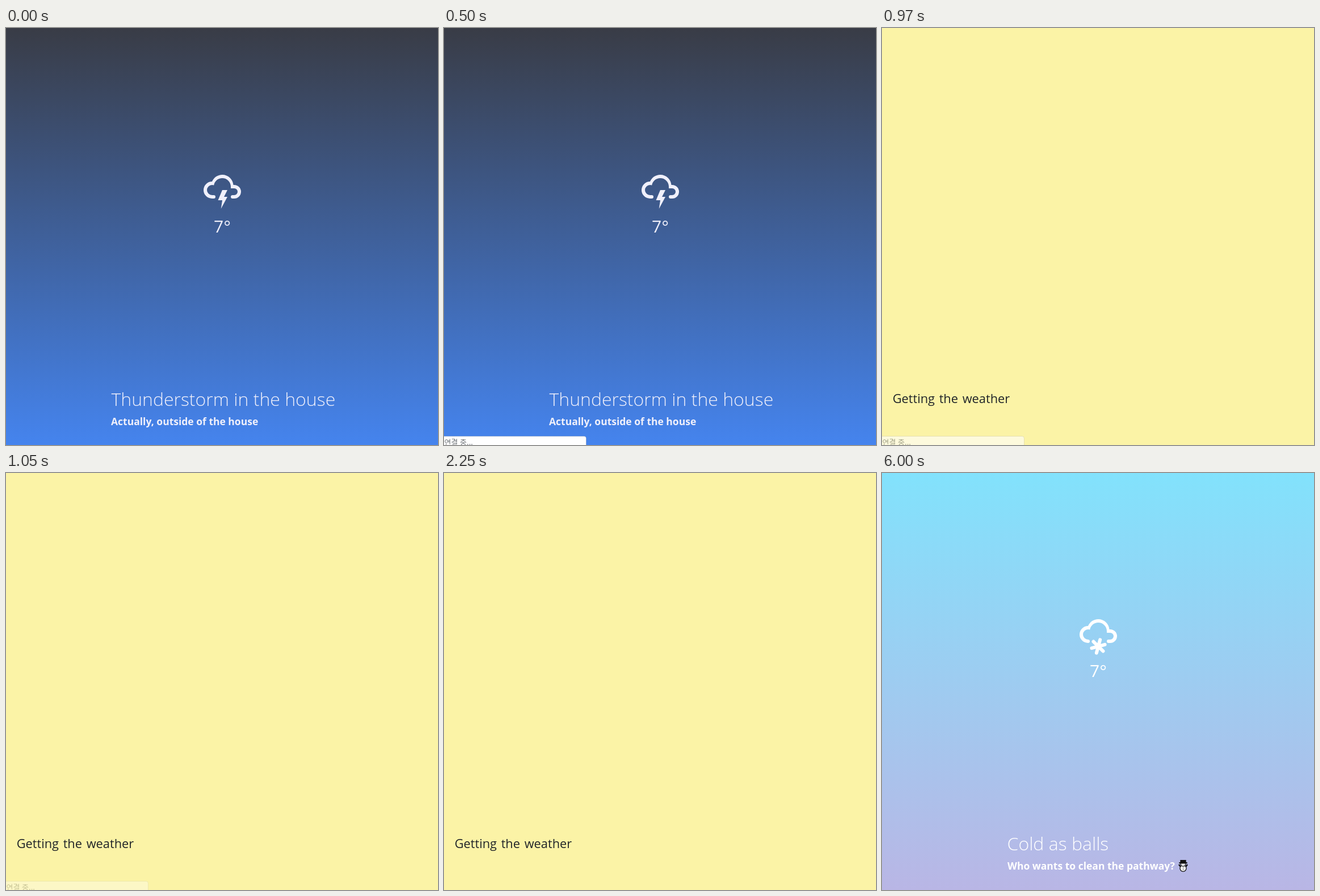
An HTML page that plays this animation: 761x736 px, repeating every 8 s.

```html
<!DOCTYPE html>
<html lang="en">
<head>
<meta charset="utf-8">
<title>Weather</title>
<style>
html, body { margin: 0; width: 100%; height: 100%; overflow: hidden; }
svg { display: block; }
text { font-family: "Open Sans", "Noto Sans", sans-serif; }
.temp { font-size: 30px; }
.title { font-size: 32px; font-weight: 300; }
.sub { font-size: 17.5px; font-weight: 700; }
.loading { font-size: 21.8px; word-spacing: 2px; fill: #212529; }
.status { font: 13px "Noto Sans CJK KR", "Noto Sans CJK", sans-serif; fill: #70757a; }
</style>
</head>
<body>
<svg width="761" height="736" viewBox="0 0 761 736">
  <defs>
    <linearGradient id="night" x2="0" y2="1">
      <stop stop-color="#393c46"/><stop offset="1" stop-color="#4584ee"/>
    </linearGradient>
    <linearGradient id="frost" x2="0" y2="1">
      <stop stop-color="#82e2fc"/><stop offset="1" stop-color="#b9b6e5"/>
    </linearGradient>
    <path id="cloud" d="M6 16A5 5 0 0 1 1 11A5 5 0 0 1 6 6C7 3.65 9.3 2 12 2C15.43 2 18.24 4.66 18.5 8.03L19 8A4 4 0 0 1 19 16H18A1 1 0 0 1 18 14H19A2 2 0 0 0 19 10H17V9A5 5 0 0 0 12 4C9.5 4 7.45 5.82 7.06 8.19C6.73 8.07 6.37 8 6 8A3 3 0 0 0 6 14A1 1 0 0 1 6 16Z"/>
  </defs>

  <g id="storm" fill="#f0f0fb">
    <rect width="761" height="736" fill="url(#night)"/>
    <g transform="translate(345 253) scale(3)">
      <use href="#cloud"/>
      <path d="M6 14H7A1 1 0 0 1 7 16H6ZM12 11H15L13 15H15L11.25 22L12 17H9.5Z"/>
    </g>
    <text class="temp" x="381" y="361" text-anchor="middle">7°</text>
    <text class="title" x="185.5" y="667">Thunderstorm in the house</text>
    <text class="sub" x="185" y="700.5">Actually, outside of the house</text>
  </g>

  <g id="loading">
    <rect width="761" height="736" fill="#fbf3a6"/>
    <text class="loading" x="18.7" y="662">Getting the weather</text>
  </g>

  <g id="snow" fill="#fff">
    <rect width="761" height="736" fill="url(#frost)"/>
    <g transform="translate(345 252) scale(3)">
      <use href="#cloud"/>
      <path d="M13.04 14.14L10.96 21.86M9.17 15.17L14.83 20.83M8.14 19.04L15.86 16.96" stroke="#fff" stroke-width="2" stroke-linecap="round"/>
    </g>
    <text class="temp" x="381" y="360" text-anchor="middle">7°</text>
    <text class="title" x="220.5" y="666">Cold as balls</text>
    <text class="sub" x="221" y="699.5">Who wants to clean the pathway?</text>
    <g stroke="#111" stroke-width="1.3">
      <path d="M523 691l3 4M538 691l-3 4" stroke-width="2.4"/>
      <circle cx="530.5" cy="697.8" r="5.5"/>
      <circle cx="530.5" cy="690" r="4.2"/>
      <path d="M526 683.6h9v4h2v1h-13v-1h2Z" fill="#111"/>
      <path d="M528.5 690h1M531.5 690h1M530 697h1M530 700h1"/>
    </g>
  </g>

  <g id="status">
    <path d="M-1 720.5H246.500a4 4 0 0 1 4 4V740H-1Z" fill="#fff" stroke="#000" stroke-opacity=".14"/>
    <text class="status" x="0.5" y="735.5" lang="ko">연결 중...</text>
  </g>
</svg>
<script>
const LOOP = 8000;
const el = id => document.getElementById(id);
const scenes = [["storm", 0, 820], ["loading", 820, 3000], ["snow", 3000, LOOP]];

function statusOpacity(t) {
  if (t < 500 || t >= 1130) return 0;
  return t < 970 ? 1 : t < 1050 ? 0.62 : 0.36;
}

const start = performance.now();
function draw() {
  const t = (performance.now() - start) % LOOP;
  for (const [id, from, to] of scenes)
    el(id).style.display = t >= from && t < to ? "" : "none";
  el("status").style.opacity = statusOpacity(t);
  requestAnimationFrame(draw);
}
draw();
</script>
</body>
</html>
```
